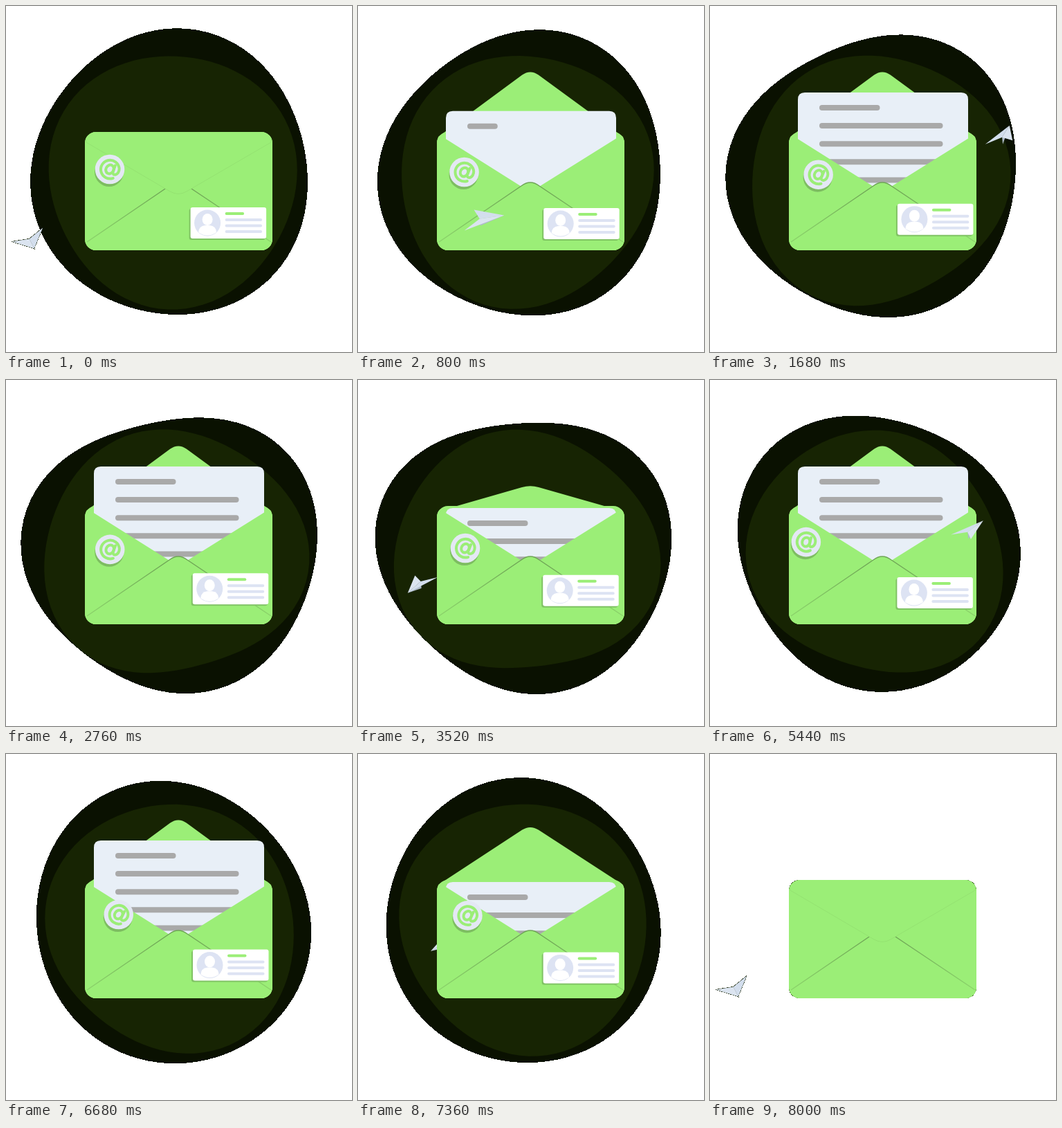
These frames come from a looping animation (500 px wide and 500 px high, 8040 ms). An HTML page:

```html
<!DOCTYPE html>
<html lang="en">
<head>
<meta charset="utf-8">
<title>Mail</title>
<style>
  html, body { margin: 0; width: 100%; height: 100%; overflow: hidden; background: #fff; }
  svg { display: block; width: 100%; height: 100%; }
</style>
</head>
<body>
<svg viewBox="0 0 500 500">
  <defs>
    <linearGradient id="crease" gradientUnits="userSpaceOnUse" x1="114" y1="0" x2="385" y2="0">
      <stop offset="0" stop-color="#8cd56b"/>
      <stop offset=".42" stop-color="#6fa556"/>
      <stop offset=".58" stop-color="#6fa556"/>
      <stop offset="1" stop-color="#8cd56b"/>
    </linearGradient>
    <clipPath id="bounds"><path id="boundsPath"/></clipPath>
    <clipPath id="body"><rect x="114" y="182" width="271" height="171" rx="16"/></clipPath>
    <clipPath id="aboveFloor"><rect width="500" height="340"/></clipPath>
  </defs>

  <!-- hard dark rims, visible only outside the blob -->
  <g fill="#142000" shape-rendering="crispEdges">
    <rect x="114" y="182" width="271" height="171" rx="15"/>
    <path id="planeRim" stroke="#142000"/>
  </g>

  <g id="blobs">
    <path id="outer" fill="#0a1101" shape-rendering="crispEdges"/>
    <path id="inner" fill="#172403" clip-path="url(#bounds)"/>
  </g>

  <g id="behind"></g>

  <g fill="#9bee77">
    <path id="flapOpen"/>
    <rect x="114" y="182" width="271" height="171" rx="16"/>
  </g>
  <g clip-path="url(#aboveFloor)">
    <g id="letter">
      <path d="M127 353V135q0-10 10-10H363q10 0 10 10V353z" fill="#e8eff7"/>
      <g id="lines" stroke="#a9a9a9" stroke-width="8" stroke-linecap="round"></g>
    </g>
  </g>
  <g clip-path="url(#body)">
    <path d="M114 184L249 269L385 184V353H114z" fill="#9bee77"/>
    <path d="M117 341L236 260Q249 250 262 260L383 341V360H117z" fill="#9bee77"/>
    <path d="M117 341L236 260Q249 250 262 260L383 341" fill="none" stroke="url(#crease)" stroke-width="1.5"/>
    <path id="flapClosed" fill="#9bee77" stroke="#94e271"/>
  </g>

  <g id="badge">
    <circle cx="-1" cy="4" r="21" fill="#7dbd61"/>
    <circle r="21.3" fill="#e4e8f4"/>
    <g id="at" fill="none" stroke="#9bee77" stroke-width="4" stroke-linecap="round">
      <ellipse rx="5.5" ry="6.6" transform="rotate(20)"/>
      <path d="M7 -6.5L5 3Q5 7.500 9 6.500C13 5 14 0 13.300 -3.500A13.400 13.400 0 1 0 6.500 12"/>
    </g>
  </g>

  <g id="card">
    <rect x="-2" y="2" width="110" height="45" rx="3" fill="#80c364"/>
    <rect width="109.500" height="45" rx="3" fill="#fff"/>
    <circle cx="24.500" cy="22.500" r="19" fill="#dde3f3"/>
    <ellipse cx="24.500" cy="17.500" rx="7.500" ry="8.500" fill="#fff"/>
    <path d="M11.500 36Q12 27 21 26H28Q37 27 37.500 36Q24.500 45 11.500 36z" fill="#fff"/>
    <g stroke-width="4" stroke-linecap="round">
      <path d="M52 9H75.500" stroke="#9bee77"/>
      <path d="M52 18H101.500M52 26.500H101.500M52 35H101.500" stroke="#dde3f3"/>
    </g>
  </g>

  <g id="front">
    <g id="plane">
      <path id="keel" fill="#aebac9"/>
      <path id="wingA" fill="#d3deed"/>
      <path id="wingB" fill="#dbe4f0"/>
    </g>
  </g>
</svg>
<script>
const LOOP = 8040, CYCLE = 8000, HALF = 4000, TURN = 2 * Math.PI;
const el = id => document.getElementById(id);
const set = (id, d) => el(id).setAttribute('d', d);
const move = (id, x, y) => el(id).setAttribute('transform', `translate(${x} ${y})`);
const clamp = v => Math.max(0, Math.min(1, v));
const smooth = (t, a, b) => { const u = clamp((t - a) / (b - a)); return u * u * (3 - 2 * u); };
const swing = (angle, c, s) => c * Math.cos(angle) + s * Math.sin(angle);
const wave = (size, angle, degrees) => size * Math.cos(angle - degrees * TURN / 360);

// A circle bent by two- and three-lobed waves; each has a still part and a part that turns.
function blobPath(cx, cy, radius, bend) {
  const steps = 90;
  const points = Array.from({ length: steps }, (_, i) => {
    const a = i * TURN / steps, r = radius + bend(a);
    return `${(cx + r * Math.cos(a)).toFixed(2)} ${(cy + r * Math.sin(a)).toFixed(2)}`;
  });
  return 'M' + points.join('L') + 'z';
}

function drawBlobs(turn) {
  const outline = blobPath(241.2 - 2.5 * Math.cos(turn), 246.2 - 3.4 * Math.cos(turn),
    203.4 + 2.7 * Math.sin(turn),
    a => wave(3.2, 2 * a, 41) + wave(6.3, 2 * a - turn, 205) +
         wave(3.6, 3 * a, 224) + wave(6.2, 3 * a - turn, 95));
  set('outer', outline);
  set('boundsPath', outline);
  set('inner', blobPath(240.6, 250.7, 181 + 2 * Math.sin(turn),
    a => wave(4.4, 2 * a, 22) + wave(6.2, 2 * a - turn, 190) +
         wave(1.9, 3 * a, 48) + wave(6.3, 3 * a - turn, 265)));
}

function drawFloaters(turn) {
  const x = 152 + swing(turn, 4, 2) - 5 * Math.sin(2 * turn) - 6 * Math.cos(3 * turn);
  move('badge', x, 238.5 + swing(turn, -2.5, 6));
  el('at').setAttribute('transform', `rotate(${(x - 135) * .55})`);
  move('card', 268.9 - 2.3 * Math.cos(2 * turn),
    285.3 + 3.2 * Math.cos(turn) + swing(2 * turn, 2.5, 3.6));
}

const letterLines = Array.from({ length: 5 }, (_, i) => {
  const line = document.createElementNS('http://www.w3.org/2000/svg', 'line');
  const y = 147 + 26.1 * i;
  line.setAttribute('x1', 162);
  line.setAttribute('y1', y);
  line.setAttribute('y2', y);
  el('lines').append(line);
  return { line, length: i ? 170.5 : 79.5, start: 720 + 180 * i };
});

function drawEnvelope(t) {
  const shut = 1 - smooth(t, 40, 640) + smooth(t, 3260, 3940);
  const base = 189 + 8 * shut * shut, apex = 91 + 184 * shut;
  const shoulder = apex + (base - apex) * 12 / 133;
  const edge = `L116 ${base}L237 ${shoulder}Q249 ${apex} 261 ${shoulder}L383 ${base}`;
  const isDown = apex > base;
  set('flapOpen', isDown ? '' : 'M114 198' + edge + 'L385 198z');
  set('flapClosed', isDown ? 'M114 180' + edge + 'L385 180z' : '');

  const raised = smooth(t, 480, 1080) - smooth(t, 2760, 3320);
  move('letter', 0, 60 * (1 - raised));
  for (const { line, length, start } of letterLines) {
    const drawn = clamp((t - start) / 180);
    line.setAttribute('x2', 162 + length * drawn);
    line.style.display = drawn ? '' : 'none';
  }
}

// The plane circles the envelope on a tilted orbit: first half in front, second half behind.
function drawPlane(t) {
  const orbit = t / HALF * TURN;
  const centre = [241 + swing(orbit, -207, 0), 250 + swing(orbit, 87, 32)];
  const ahead = [swing(orbit, 10, 50), swing(orbit, 20, -14)];
  const span = [swing(orbit, 45, 0), swing(orbit, -20, -25)];
  const point = (forward, side) => centre.map((c, i) => c + forward * ahead[i] + side * span[i]);
  const face = (...pts) => 'M' + pts.join('L') + 'z';

  const nose = point(.67, 0), fold = point(-.03, 0);
  const keel = face(nose, fold, [fold[0] + 1, fold[1] + 10]);
  const wingA = face(nose, point(-.33, .5), fold);
  const wingB = face(nose, point(-.33, -.5), fold);
  set('keel', keel);
  set('wingA', wingA);
  set('wingB', wingB);
  set('planeRim', keel + wingA + wingB);
  const layer = el(t < HALF / 2 ? 'front' : 'behind');
  if (el('plane').parentNode !== layer) layer.append(el('plane'));
}

function render(time) {
  const t = time % LOOP, ended = t >= CYCLE;
  for (const id of ['blobs', 'badge', 'card']) el(id).style.display = ended ? 'none' : '';
  const now = t % CYCLE, turn = now / CYCLE * TURN;
  drawBlobs(turn);
  drawFloaters(turn);
  drawEnvelope(now % HALF);
  drawPlane(now % HALF);
}

const begin = performance.now();
function tick() {
  render(performance.now() - begin);
  requestAnimationFrame(tick);
}
tick();
</script>
</body>
</html>
```
